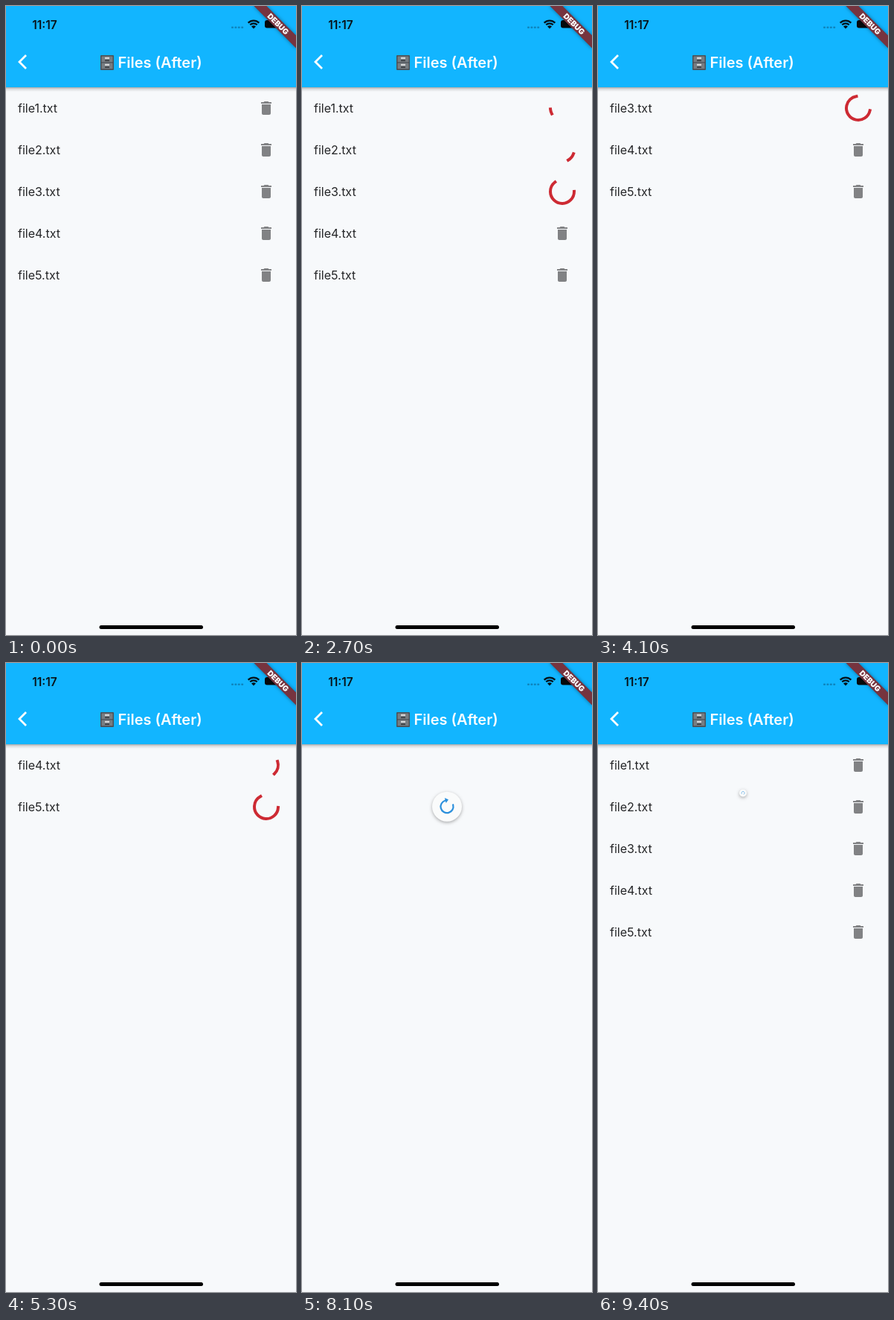
Write an HTML page with a canvas that moves like this. It is 390 by 844 pixels and loops after 9.5 s.

```html
<!DOCTYPE html>
<html lang="en">
<head>
<meta charset="utf-8">
<title>Files</title>
<style>
  html, body { margin: 0; width: 100%; height: 100%; overflow: hidden; background: #f7f9fb; }
  canvas { display: block; width: 390px; height: 844px; }
</style>
</head>
<body>
<canvas id="stage"></canvas>
<script>
const W = 390, H = 844, LOOP = 9500, STEP = 100;
const HEADER = 109, ROW = 56, FIRST_ROW = 137;
const TAPS = [1255, 1655, 2310, 4130, 4895];
const REMOVALS = TAPS.map(t => t + 2000);
const PULL = 7350, RELEASE = 8250, RELOADED = 9250;
const FONT = 'Inter, Roboto, sans-serif';
const TAU = Math.PI * 2;

const canvas = document.getElementById('stage');
const ctx = canvas.getContext('2d');
const dpr = window.devicePixelRatio || 1;
canvas.width = W * dpr;
canvas.height = H * dpr;

const trash = new Path2D('M6 19c0 1.1.9 2 2 2h8c1.1 0 2-.9 2-2V7H6v12zM19 4h-3.5l-1-1h-5l-1 1H5v2h14V4z');

const clamp = x => Math.min(1, Math.max(0, x));
const radians = deg => deg * Math.PI / 180;

// cubic-bezier(.4, 0, .2, 1)
function fastOutSlowIn(x) {
  let lo = 0, hi = 1, s = 0.5;
  for (let i = 0; i < 24; i++) {
    s = (lo + hi) / 2;
    const bx = 1.2 * s * (1 - s) ** 2 + 0.6 * s * s * (1 - s) + s ** 3;
    if (bx < x) lo = s; else hi = s;
  }
  return s * s * (3 - 2 * s);
}

// Indeterminate progress arc, in degrees clockwise from the top
function progressArc(ms) {
  const p = ms / 1333 % 1;
  const head = 270 * fastOutSlowIn(clamp(p * 2));
  const tail = 270 * fastOutSlowIn(clamp(p * 2 - 1));
  return { start: tail + ms / 2222 * 360 + p * 90, sweep: Math.max(head - tail, 0.1) };
}

function strokeArc(x, y, r, start, sweep, color, width) {
  ctx.beginPath();
  ctx.arc(x, y, r, radians(start - 90), radians(start + sweep - 90));
  ctx.strokeStyle = color;
  ctx.lineWidth = width;
  ctx.lineCap = 'square';
  ctx.stroke();
}

function disc(x, y, r, color) {
  ctx.fillStyle = color;
  ctx.beginPath();
  ctx.arc(x, y, r, 0, TAU);
  ctx.fill();
}

function pill(x, y, w, h, r, color) {
  ctx.fillStyle = color;
  ctx.beginPath();
  ctx.roundRect(x, y, w, h, r);
  ctx.fill();
}

function text(str, x, y, font, color, align = 'left') {
  ctx.font = `${font} ${FONT}`;
  ctx.fillStyle = color;
  ctx.textAlign = align;
  ctx.fillText(str, x, y);
}

function drawTrash(x, y) {
  ctx.save();
  ctx.translate(x - 12, y - 12);
  ctx.fillStyle = '#818284';
  ctx.fill(trash);
  ctx.restore();
}

function drawList(t) {
  const reloaded = t >= RELOADED;
  const gone = reloaded ? 0 : REMOVALS.filter(r => r <= t).length;
  const lastRemoval = gone ? REMOVALS[gone - 1] : 0;
  for (let i = gone; i < TAPS.length; i++) {
    const y = FIRST_ROW + (i - gone) * ROW;
    const age = t - TAPS[i];
    text(`file${i + 1}.txt`, 16, y + 6, '400 16px', '#252628');
    if (reloaded || age < 0) {
      drawTrash(350, y);
      continue;
    }
    const ripple = age / 300;
    if (ripple < 1) disc(350, y, 12 + 23 * ripple, `rgba(0,0,0,${0.07 * (1 - ripple)})`);
    // Rows rebuild on every removal, which restarts their spinners
    const arc = progressArc(t - Math.max(TAPS[i], lastRemoval));
    strokeArc(350, y, 16, arc.start, arc.sweep, '#cd2a33', 4);
  }
}

function drawArrowhead(r, angle, size) {
  ctx.save();
  ctx.rotate(radians(angle));
  ctx.translate(0, -r);
  ctx.beginPath();
  ctx.moveTo(0, -size);
  ctx.lineTo(size * 1.2, 0);
  ctx.lineTo(0, size);
  ctx.fillStyle = '#2b8fdc';
  ctx.fill();
  ctx.restore();
}

function drawRefresh(t) {
  if (t < PULL) return;
  const dragging = t < RELEASE;
  const peak = 1.225;
  const drag = dragging
    ? peak * Math.sin(Math.PI / 2 * clamp((t - PULL) / 850))
    : peak + (1 - peak) * clamp((t - RELEASE) / 150);
  const scale = 1 - clamp((t - RELOADED) / 200);
  if (scale <= 0) return;

  ctx.save();
  ctx.beginPath();
  ctx.rect(0, HEADER, W, H - HEADER);
  ctx.clip();
  ctx.translate(195, 85.5 + 89 * drag);
  ctx.scale(scale, scale);

  ctx.save();
  ctx.shadowColor = 'rgba(0,0,0,.32)';
  ctx.shadowBlur = 4 * dpr;
  ctx.shadowOffsetY = 1.5 * dpr;
  disc(0, 0, 20, '#fafbfb');
  ctx.restore();

  const armed = clamp(drag);
  const arc = progressArc(666 * (dragging ? armed : 1) + Math.max(0, t - RELEASE));
  const start = arc.start - 78;
  ctx.globalAlpha = dragging ? armed : 1;
  strokeArc(0, 0, 8.5, start, arc.sweep, '#2b8fdc', 2.2);
  if (dragging) drawArrowhead(8.5, start + arc.sweep, 3.6 * armed);
  ctx.restore();
}

function drawCabinet(x, y) {
  pill(x, y, 18, 20, 1, '#4b5157');
  for (const top of [y + 1.5, y + 10.5]) {
    pill(x + 1.5, top, 15, 7.8, 0.6, '#777d82');
    pill(x + 6, top + 1.2, 6, 2.4, 0.4, '#d6d8d9');
    pill(x + 6, top + 5, 6, 1.4, 0.5, '#34383c');
  }
}

function drawStatusBar() {
  text('11:17', 52, 30.5, '600 15.5px', '#08131a', 'center');
  for (let i = 0; i < 4; i++) pill(303 + i * 4.4, 27.5, 3, 2.5, 1, 'rgba(10,60,90,.4)');

  ctx.strokeStyle = '#05121a';
  ctx.lineCap = 'butt';
  ctx.lineWidth = 2.3;
  for (const r of [10.4, 6.7]) {
    ctx.beginPath();
    ctx.arc(333, 30, r, radians(-135), radians(-45));
    ctx.stroke();
  }
  ctx.fillStyle = '#05121a';
  ctx.beginPath();
  ctx.moveTo(333, 30.5);
  ctx.arc(333, 30.5, 4.2, radians(-135), radians(-45));
  ctx.fill();

  pill(348, 19, 20, 10.5, 3, '#05090c');
  pill(369, 22.5, 1.5, 4, 0.7, '#05090c');
}

function drawBanner() {
  ctx.save();
  ctx.translate(W, 0);
  ctx.rotate(Math.PI / 4);
  ctx.save();
  ctx.shadowColor = 'rgba(0,0,0,.4)';
  ctx.shadowBlur = 5 * dpr;
  ctx.fillStyle = '#76343f';
  ctx.fillRect(-40, 28, 80, 12);
  ctx.restore();
  text('DEBUG', 0, 37.7, '900 10.2px', '#fff', 'center');
  ctx.restore();
}

function drawHeader() {
  const shade = ctx.createLinearGradient(0, HEADER, 0, HEADER + 6);
  shade.addColorStop(0, 'rgba(0,0,0,.32)');
  shade.addColorStop(0.4, 'rgba(0,0,0,.12)');
  shade.addColorStop(1, 'rgba(0,0,0,0)');
  ctx.fillStyle = shade;
  ctx.fillRect(0, HEADER, W, 6);
  ctx.fillStyle = '#12b5ff';
  ctx.fillRect(0, 0, W, HEADER);

  ctx.strokeStyle = '#fff';
  ctx.lineWidth = 2.8;
  ctx.lineCap = 'butt';
  ctx.lineJoin = 'miter';
  ctx.beginPath();
  ctx.moveTo(27, 66);
  ctx.lineTo(18, 75);
  ctx.lineTo(27, 84);
  ctx.stroke();

  drawCabinet(127, 66);
  text('Files (After)', 150.5, 83, '600 20px', '#f8fcff');
  drawStatusBar();
  drawBanner();
}

function draw(now) {
  const t = Math.floor(now % LOOP / STEP) * STEP;
  ctx.setTransform(dpr, 0, 0, dpr, 0, 0);
  ctx.fillStyle = '#f7f9fb';
  ctx.fillRect(0, 0, W, H);
  drawList(t);
  drawRefresh(t);
  drawHeader();
  pill(125.5, 831, 139.5, 5, 2.5, '#000');
}

let origin;
function tick(now) {
  origin ??= now;
  draw(now - origin);
  requestAnimationFrame(tick);
}
draw(0);
requestAnimationFrame(tick);
</script>
</body>
</html>
```
